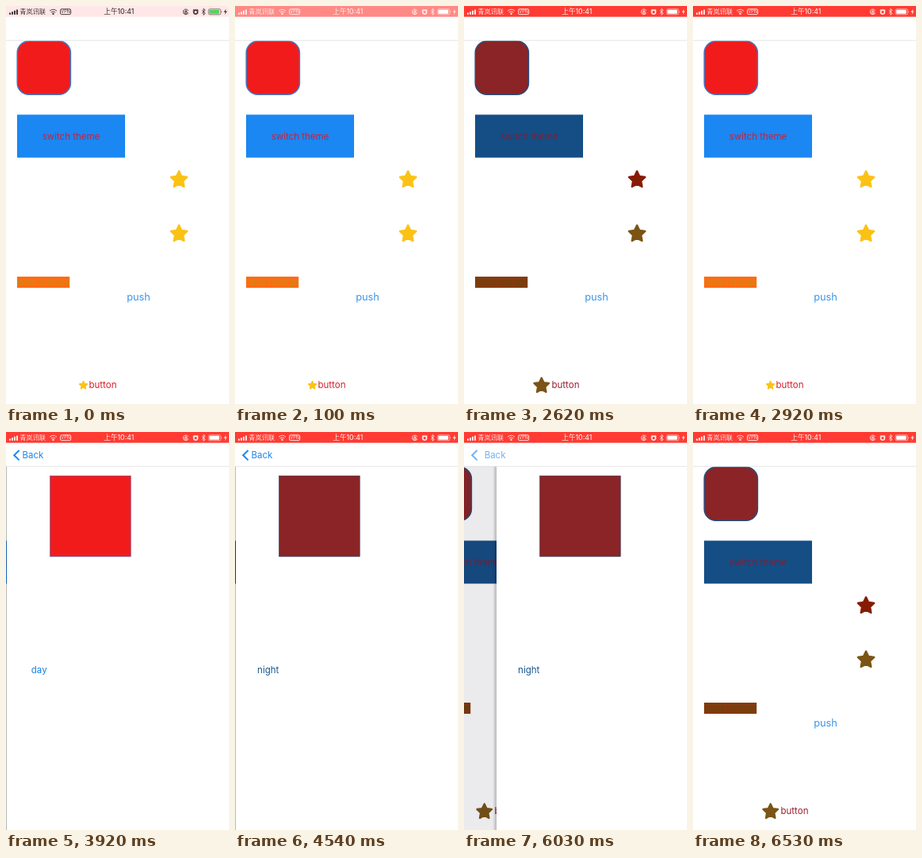
Write an HTML page that moves like this. It is 281x500 px and loops after 6630 ms.

```html
<!DOCTYPE html>
<html lang="en">
<head>
<meta charset="utf-8">
<title>Theme switch</title>
<style>
html, body { margin: 0; width: 100%; height: 100%; overflow: hidden; background: #fff; }
svg { display: block; width: 100%; height: 100%; font: 11.5px Inter, "Noto Sans", sans-serif; }
.mid { text-anchor: middle; }
.star { stroke-width: 2.4; stroke-linejoin: round; }
#status { font: 8.2px Inter, "Noto Sans CJK SC", "Noto Sans CJK", sans-serif; fill: var(--ink); }
#status .line { fill: none; stroke: var(--ink); stroke-width: .9; }
</style>
</head>
<body>
<svg viewBox="0 0 281 500" preserveAspectRatio="none">
  <defs>
    <polygon id="star"/>
    <linearGradient id="shade"><stop stop-opacity="0"/><stop offset="1" stop-opacity=".22"/></linearGradient>
  </defs>

  <g id="main">
    <rect x="14.2" y="44.2" width="67.2" height="67" rx="14.5" stroke-width="1.5" style="fill:var(--red);stroke:var(--edge)"/>
    <rect x="14" y="136.5" width="136" height="54" style="fill:var(--blue)"/>
    <text class="mid" x="82" y="167.5" style="fill:var(--switch)">switch theme</text>
    <use class="star" href="#star" transform="translate(218 218.3)" style="fill:var(--starA);stroke:var(--starA)"/>
    <use class="star" href="#star" transform="translate(218 286.3)" style="fill:var(--starB);stroke:var(--starB)"/>
    <rect x="14" y="340" width="66.2" height="14" style="fill:var(--label)"/>
    <text x="14" y="351" font-size="11" style="fill:var(--labelText)">label change</text>
    <text class="mid" x="167" y="370.3" font-size="12.8" fill="#3a94ea">push</text>
    <use class="star" id="icon" href="#star" style="fill:var(--starB);stroke:var(--starB)"/>
    <text id="button" y="480.3" style="fill:var(--button)">button</text>
  </g>

  <rect id="dim" y="43" width="281" height="457" fill="#1c1022"/>
  <g id="page">
    <rect x="-5" y="43" width="5" height="457" fill="url(#shade)"/>
    <rect y="43" width="281" height="457" fill="#fff"/>
    <rect x="54.3" y="55" width="102" height="101.5" stroke-width=".5" style="fill:var(--red);stroke:var(--edge)"/>
    <text class="mid" id="mode" x="40.7" y="303.3" style="fill:var(--mode)"></text>
  </g>

  <rect y="13" width="281" height="30" fill="#fff"/>
  <rect y="42.8" width="281" height=".8" fill="#dedee0"/>
  <g id="back" fill="#1c86ee">
    <path d="M16.6 23 10.2 29.2l6.4 6.2" fill="none" stroke="#1c86ee" stroke-width="2"/>
    <text id="backText" y="33.3">Back</text>
  </g>

  <rect id="bar" width="281" height="13.6"/>
  <g id="status">
    <path d="M4 8.4h2v2.4H4zM7 7.2h2v3.6H7zM10 5.8h2v5h-2zM13 4.4h2v6.4h-2z"/>
    <text x="17.3" y="10.2">青岚讯联</text>
    <path class="line" stroke-width="1.2" d="M55 6.2q4.5-3.8 9 0M56.7 8q2.8-2.4 5.6 0"/>
    <circle cx="59.5" cy="9.8" r="1.2"/>
    <rect class="line" x="68.5" y="3.8" width="13.2" height="6.8" rx="1.6"/>
    <text class="mid" x="75.1" y="9.2" font-size="5.5">VPN</text>
    <text class="mid" x="142.3" y="10.2" font-size="8.6" font-weight="500">上午10:41</text>
    <path class="line" d="M229.6 6a3.3 3.3 0 1 0 .1 2.5M225.3 7.2h2.8v2h-2.8zM225.9 7V6q.8-1 1.6 0v1"/>
    <circle class="line" cx="239" cy="7.6" r="2.5" style="stroke-width:1.6"/>
    <path class="line" d="M235.7 5.5l1.6-1.6M242.3 5.5l-1.6-1.6M247 5.3l4 4-2 2V3.3l2 2-4 4"/>
    <rect class="line" x="255.2" y="3.8" width="15.4" height="7" rx="1.6" style="stroke-width:.6"/>
    <rect id="charge" x="256.2" y="4.8" width="12.6" height="5" rx=".8"/>
    <path d="M271.3 6q1.2 1.3 0 2.6zM277.4 3.4l-3 4.4h2l-.8 3.2 3-4.4h-2z"/>
  </g>
</svg>
<script>
const $ = id => document.getElementById(id);
const LOOP = 6630, W = 281;
const LEAD = 16; // a drawn picture appears one refresh later

// Each colour: [day, night]
const theme = {
  red: ['#f11b1c', '#8a2426'],
  edge: ['#3f77c4', '#2a4c7c'],
  blue: ['#1b87f2', '#154e85'],
  switch: ['#c4223f', '#74233c'],
  starA: ['#fbc216', '#861c06'],
  starB: ['#fbc216', '#7b5416'],
  label: ['#ff6a14', '#86390d'],
  labelText: ['#d08a10', '#6b430c'],
  button: ['#d91f2a', '#9c1f30'],
  mode: ['#1580e4', '#1a568f']
};

// [start ms, bar redness, night amount, left edge of the pushed page]
const steps = [
  [0, .12, 0, W], [100, .6, 0, W], [200, 1, 0, W],
  [2620, 1, 1, W], [2820, 1, .5, W], [2920, 1, 0, W],
  [3920, 1, 0, 1], [4540, 1, 1, 1],
  [5040, 1, 1, 5], [5160, 1, 1, 13], [6030, 1, 1, 41], [6530, 1, 1, W]
];

const rgb = hex => [1, 3, 5].map(i => parseInt(hex.slice(i, i + 2), 16));
function mix(a, b, k) {
  const to = rgb(b);
  return `rgb(${rgb(a).map((v, i) => Math.round(v + (to[i] - v) * k))})`;
}

$('star').setAttribute('points', Array.from({ length: 10 }, (_, i) => {
  const r = i % 2 ? 5.3 : 10.7, a = i * Math.PI / 5;
  return [r * Math.sin(a), -r * Math.cos(a)].map(v => v.toFixed(2));
}).join(' '));

function show([, bar, night, x]) {
  const root = document.documentElement.style;
  for (const name in theme) root.setProperty('--' + name, mix(...theme[name], night));

  const light = bar > .5, rest = 1 - x / W, big = night > 0;
  root.setProperty('--ink', light ? '#ffe9e7' : '#3c3535');
  $('bar').setAttribute('fill', mix('#ffffff', '#ff3b33', bar));
  $('charge').setAttribute('fill', light ? '#fff' : '#57d160');

  $('icon').setAttribute('transform', big ? 'translate(97.7 477) scale(.92)' : 'translate(97.5 476.6) scale(.5)');
  $('button').setAttribute('x', big ? 110.5 : 104.5);

  // The screen below trails at 30% of the page's travel
  $('main').setAttribute('transform', `translate(${-.3 * W * rest})`);
  $('dim').setAttribute('opacity', .1 * rest);
  $('page').setAttribute('transform', `translate(${x})`);
  $('page').style.display = $('back').style.display = x < W ? '' : 'none';
  $('back').setAttribute('opacity', Math.max(0, 1 - x / 110));
  $('backText').setAttribute('x', 20.3 + x * .13);
  $('mode').textContent = night ? 'night' : 'day';
}

let current;
function tick() {
  const t = (performance.now() + LEAD) % LOOP;
  const step = steps.findLast(s => s[0] <= t);
  if (step !== current) show(current = step);
  requestAnimationFrame(tick);
}
tick();
</script>
</body>
</html>
```
